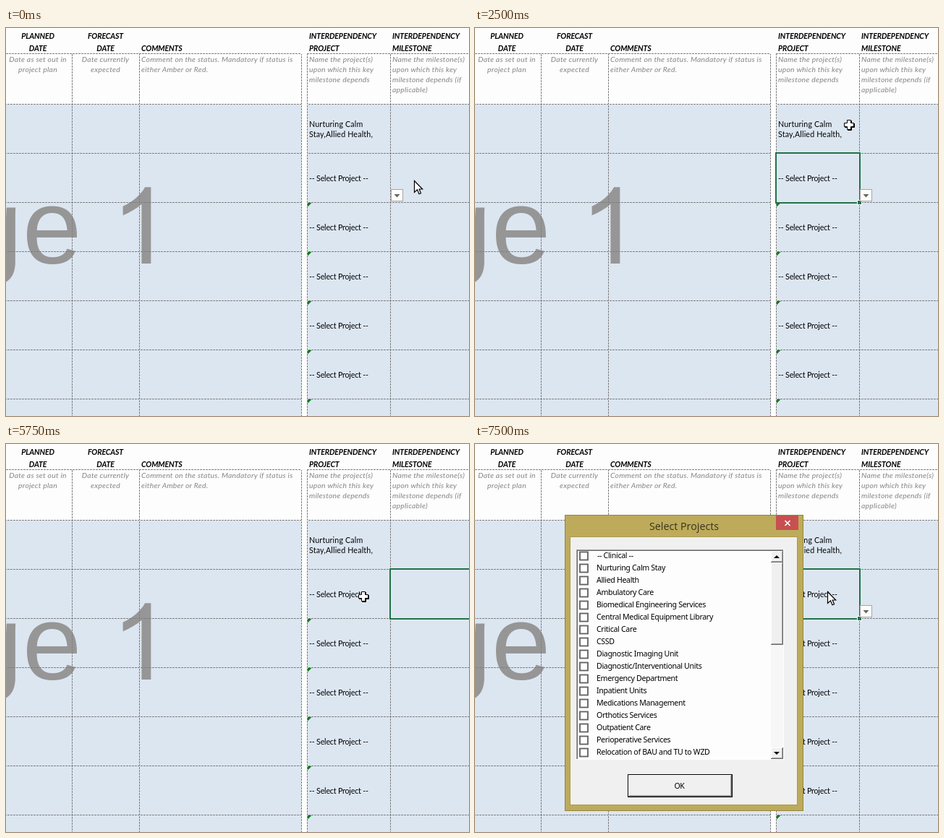
These frames come from a looping animation (640x537 px, 8000 ms). An HTML page:

```html
<!DOCTYPE html>
<html lang="en">
<head>
<meta charset="utf-8">
<title>Select projects</title>
<style>
html, body { margin: 0; width: 100%; height: 100%; overflow: hidden; background: #fdfdfd; }
svg { display: block; width: 100%; height: 100%; }
text { white-space: pre; }
.head { font: italic 700 10.6px Lato, sans-serif; letter-spacing: -.12px; }
.hint { font: italic 400 10.4px Lato, sans-serif; letter-spacing: .23px; fill: #858585; }
.cell { font: 10.7px Lato, sans-serif; letter-spacing: .16px; }
.pick { letter-spacing: -.2px; }
.item { font: 10.6px "Noto Sans", sans-serif; letter-spacing: -.33px; }
.title { font: 14.3px "Open Sans", sans-serif; fill: #39331c; }
.mid { text-anchor: middle; }
.mark { font: 147px "Liberation Sans", sans-serif; }
.grid { stroke: #808080; stroke-dasharray: 3 1; fill: none; }
</style>
</head>
<body>
<svg id="stage" viewBox="0 0 640 537" xmlns="http://www.w3.org/2000/svg"></svg>
<script>
const LOOP = 8000;
const stage = document.getElementById('stage');

const rect = (x, y, w, h, fill, extra = '') =>
  `<rect x="${x}" y="${y}" width="${w}" height="${h}" fill="${fill}" ${extra}/>`;
const path = (d, fill, extra = '') => `<path d="${d}" fill="${fill}" ${extra}/>`;
const label = (x, y, cls, str) => `<text x="${x}" y="${y}" class="${cls}">${str}</text>`;
const lines = (x, y, step, cls, list) =>
  list.map((s, i) => label(x, y + i * step, cls, s)).join('');
const range = (n, fn) => Array.from({ length: n }, (_, i) => fn(i)).join('');

// Dashes follow one screen-wide diagonal pattern
const dash = (d, x, y) => path(d, 'none', `class="grid" stroke-dashoffset="${(x + y + 1) % 4}"`);
const across = (x, y, end) => dash(`M${x} ${y + .5}H${end}`, x, y);
const down = (x, y) => dash(`M${x + .5} ${y}V537`, x, y);

function watermark() {
  const one = 'M763 0H583V1147Q518 1085 412 1023T223 930V1104Q374 1175 487 1276T647 1472H763Z';
  const k = 147 / 2048;
  return `<g fill="#969696">${label(-59, 326, 'mark', 'ge')}`
    + `<path d="${one}" transform="translate(145.6 326) scale(${k} ${-k})"/></g>`;
}

function sheet() {
  const rows = [35, ...Array.from({ length: 7 }, (_, i) => 105 + 68 * i)];
  const cols = [91, 184, 408, 416, 531];
  return rect(0, 0, 640, 537, '#fdfdfd')
    + rect(0, 106, 408, 431, '#dce6f1') + rect(417, 106, 223, 431, '#dce6f1')
    + watermark()
    + rows.map(y => across(0, y, 408) + across(416, y, 640)).join('')
    + cols.map(x => down(x, 36)).join('')
    + lines(44, 15, 17, 'head mid', ['PLANNED', 'DATE'])
    + lines(137.5, 15, 17, 'head mid', ['FORECAST', 'DATE'])
    + label(187, 32, 'head', 'COMMENTS')
    + lines(419, 15, 17, 'head', ['INTERDEPENDENCY', 'PROJECT'])
    + lines(534, 15, 17, 'head', ['INTERDEPENDENCY', 'MILESTONE'])
    + lines(44, 47, 14, 'hint mid', ['Date as set out in', 'project plan'])
    + lines(137.5, 47, 14, 'hint mid', ['Date currently', 'expected'])
    + lines(187, 47, 14, 'hint', ['Comment on the status. Mandatory if status is', 'either Amber or Red.'])
    + lines(419, 47, 14, 'hint', ['Name the project(s)', 'upon which this key', 'milestone depends'])
    + lines(534, 47, 14, 'hint', ['Name the milestone(s)', 'upon which this key', 'milestone depends (if', 'applicable)'])
    + lines(419, 137, 14, 'cell', ['Nurturing Calm', 'Stay,Allied Health,'])
    + range(5, i => label(419, 212 + 68 * i, 'cell pick', '-- Select Project --'))
    + range(5, i => path(`M417 ${242 + 68 * i}h5.5l-5.5 5.5z`, '#0e7c1a'));
}

const frame = (x, w) => rect(x, 173, w, 69, 'none', 'stroke="#217346" stroke-width="2"');

// Raised classic button face
const raised = (x, y, w, h) => rect(x, y, w, h, '#696969')
  + rect(x, y, w - 1, h - 1, '#fff') + rect(x + 1, y + 1, w - 2, h - 2, '#a0a0a0')
  + rect(x + 1, y + 1, w - 3, h - 3, '#f0f0f0');

function dialog() {
  const items = ['-- Clinical --', 'Nurturing Calm Stay', 'Allied Health', 'Ambulatory Care',
    'Biomedical Engineering Services', 'Central Medical Equipment Library', 'Critical Care',
    'CSSD', 'Diagnostic Imaging Unit', 'Diagnostic/Interventional Units',
    'Emergency Department', 'Inpatient Units', 'Medications Management',
    'Orthotics Services', 'Outpatient Care', 'Perioperative Services',
    'Relocation of BAU and TU to WZD'];
  return rect(124.5, 98.5, 329, 409, '#bdab5b', 'stroke="#94853f"')
    + label(289, 119, 'title mid', 'Select Projects')
    + rect(416, 99, 31, 20, '#c75050')
    + path('M428.5 106l7 7M435.5 106l-7 7', 'none', 'stroke="#fff" stroke-width="1.7"')
    + rect(131.5, 128.5, 314, 371, '#f0f0f0', 'stroke="#a99a50"')
    + rect(140, 146, 287, 291, '#fff') + rect(140, 146, 286, 290, '#a0a0a0')
    + rect(141, 147, 285, 289, '#696969') + rect(142, 148, 284, 288, '#fdfdfd')
    + range(items.length, i => rect(145, 149.5 + 17 * i, 11, 11, '#fff', 'stroke="#606060" stroke-width="1.8"')
      + label(i ? 168 : 169, 158 + 17 * i, 'item', items[i]))
    + rect(409, 148, 17, 288, '#f7f7f7')
    + raised(409, 148, 17, 16) + raised(409, 164, 17, 114) + raised(409, 420, 17, 16)
    + path('M413 158h8l-4 -4zM413 426h8l-4 4z', '#000')
    + rect(211, 457, 145, 32, '#000') + raised(212, 458, 143, 30)
    + label(282.5, 477, 'item mid', 'OK');
}

const ARROW = 'M.5 .5V16.5L4.5 12.8L7 18.7L9.5 17.7L7.2 12H11.7Z';
const PLUS = 'M-2.5 -6.5h5v4h4v5h-4v4h-5v-4h-4v-5h4z';
stage.innerHTML = sheet()
  + `<g id="project">${frame(416, 116)}${rect(528.5, 238.5, 6, 6, '#217346', 'stroke="#fff"')}</g>`
  + `<g id="milestone">${frame(531, 116)}</g>`
  + `<g id="drop">${rect(532.5, 223.5, 16, 16, '#fdfdfd', 'stroke="#a6a6a6"')}`
  + `${path('M536.5 230h8l-4 4.5z', '#666')}</g>`
  + `<g id="dialog">${dialog()}</g>`
  + `<g id="arrow">${path(ARROW, '#fff', 'stroke="#000" stroke-width="1.2"')}</g>`
  + `<g id="cross">${path(PLUS, '#000', 'stroke="#000" transform="translate(1 1)"')}`
  + `${path(PLUS, '#fff', 'stroke="#000"')}</g>`;

const part = {};
for (const id of ['project', 'milestone', 'drop', 'dialog', 'arrow', 'cross'])
  part[id] = document.getElementById(id);

// Pointer steps: time, x, y, shape
const pointer = [
  [0, 564, 211, 'arrow'], [750, 560, 213, 'arrow'],
  [1000, 553, 184, 'cross'], [1250, 563, 191, 'cross'], [1500, 561, 187, 'cross'],
  [1750, 528, 95, 'cross'], [2000, 486, 38, 'cross'], [2250, 502, 52, 'cross'],
  [2500, 517, 134, 'cross'], [2750, 505, 193, 'cross'], [3000, 492, 201, 'cross'],
  [3250, 488, 214, 'cross'], [4750, 536, 211, 'cross'], [5000, 552, 203, 'cross'],
  [5500, 488, 216, 'cross'], [5750, 494, 211, 'cross'],
  [6250, 488, 204, 'arrow'], [7250, 487, 204, 'arrow']
];

const show = (id, on) => { part[id].style.display = on ? '' : 'none'; };

function draw(t) {
  const [, x, y, shape] = pointer.findLast(step => step[0] <= t);
  const onMilestone = t >= 5250 && t < 6250;
  show('project', t >= 1250 && !onMilestone);
  show('milestone', onMilestone);
  show('drop', !onMilestone);
  show('dialog', t >= 6250);
  show('arrow', shape === 'arrow');
  show('cross', shape === 'cross');
  part[shape].setAttribute('transform', `translate(${x} ${y})`);
}

const start = performance.now();
function tick(now) {
  draw(Math.max(0, now - start) % LOOP);
  requestAnimationFrame(tick);
}
draw(0);
requestAnimationFrame(tick);
</script>
</body>
</html>
```
